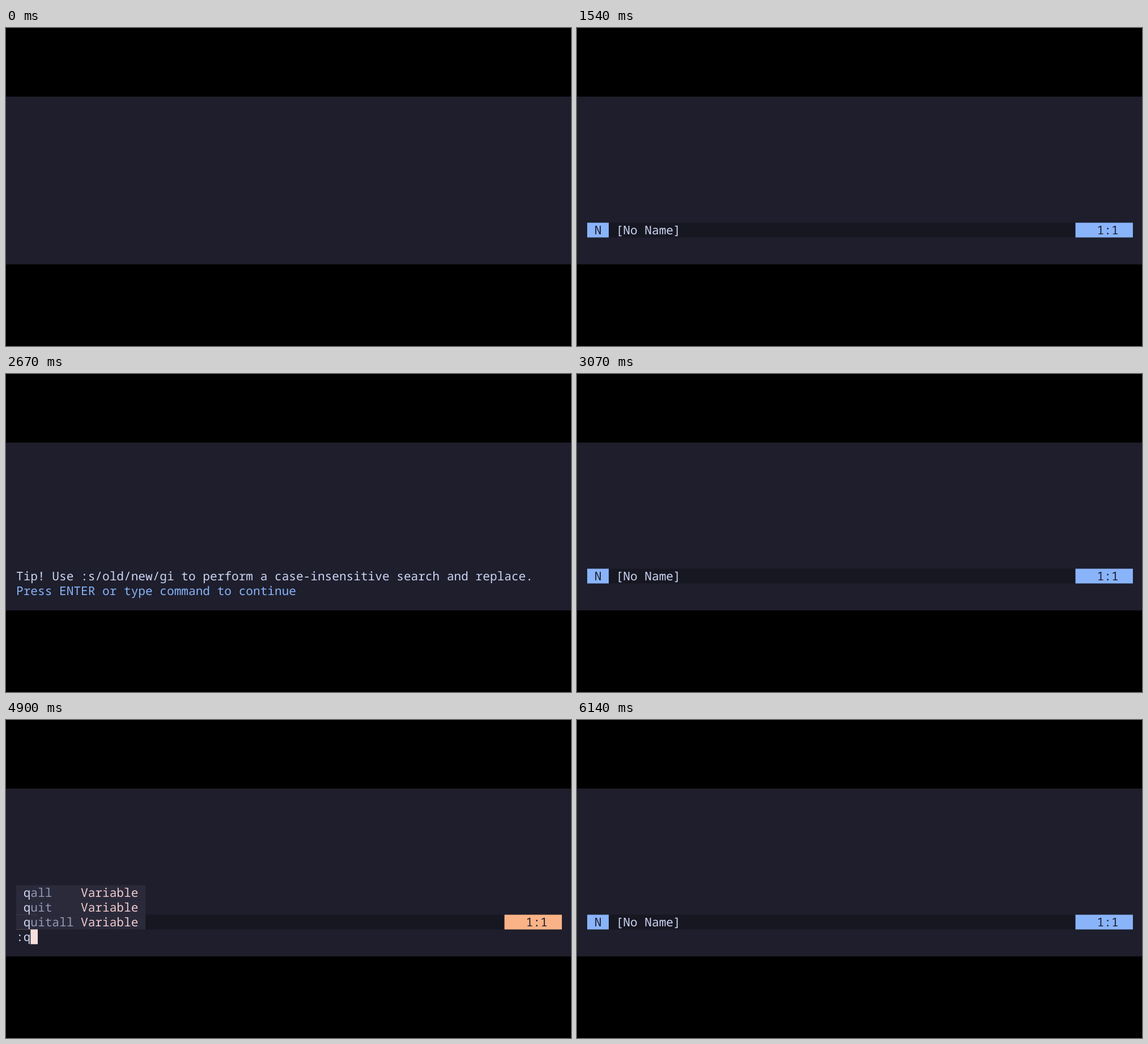
Write an HTML page that moves like this. It is 997 px wide and 561 px high and loops after 8 s.

```html
<!DOCTYPE html>
<html lang="en">
<head>
<meta charset="utf-8">
<title>Editor tip</title>
<style>
  html, body { margin: 0; height: 100%; overflow: hidden; background: #000; }
  svg { display: block; width: 997px; height: 561px; }
  text {
    font: 21.11px "Noto Sans Mono", "DejaVu Sans Mono", monospace;
    text-rendering: geometricPrecision;
    white-space: pre;
  }
</style>
</head>
<body>
<svg viewBox="0 0 997 561">
  <rect y="121" width="997" height="296" fill="#1e1e2c"/>
</svg>
<script>
const CELL = 12.67, ROW = 26, LEFT = 18, TOP = 291.5, LOOP = 8000;
const C = {
  bar: '#171722', ink: '#1e1e2e', text: '#cdd6f4', blue: '#89b4fa', peach: '#fab387',
  menu: '#2a2a3b', dim: '#9399b2', pink: '#f2cdcd', cursor: '#f5e0dc'
};
const svg = document.querySelector('svg');

function add(parent, tag, attrs, content = '') {
  const el = document.createElementNS('http://www.w3.org/2000/svg', tag);
  for (const key in attrs) el.setAttribute(key, attrs[key]);
  el.textContent = content;
  return parent.appendChild(el);
}
const layer = () => add(svg, 'g', {});
const box = (g, col, row, cols, fill) => add(g, 'rect', {
  x: LEFT + col * CELL, y: TOP + row * ROW, width: cols * CELL, height: ROW, fill
});
const write = (g, col, row, fill, str) => add(g, 'text', {
  x: LEFT + col * CELL, y: TOP + row * ROW + 20.5, fill
}, str);

function statusLine(mode, accent) {
  const g = layer();
  box(g, 0, 2, 76, C.bar);
  box(g, 0, 2, 3, accent);
  box(g, 68, 2, 8, accent);
  write(g, 1, 2, C.ink, mode);
  write(g, 4, 2, C.text, '[No Name]');
  write(g, 71, 2, C.ink, '1:1');
  return g;
}

const normal = statusLine('N', C.blue);
const command = statusLine('C', C.peach);
write(command, 0, 3, C.text, ':');

const tip = layer();
write(tip, 0, 2, C.text, 'Tip! Use :s/old/new/gi to perform a case-insensitive search and replace.');
write(tip, 0, 3, C.blue, 'Press ENTER or type command to continue');

const typed = layer();
write(typed, 1, 3, C.text, 'q');

const menu = layer();
['all', 'uit', 'uitall'].forEach((rest, row) => {
  box(menu, 0, row, 18, C.menu);
  write(menu, 1, row, C.text, 'q');
  write(menu, 2, row, C.dim, rest);
  write(menu, 9, row, C.pink, 'Variable');
});

const cursor = layer();
box(cursor, 0, 3, 1, C.cursor);

function draw(now) {
  const t = now % LOOP;
  const during = (from, to) => t >= from && t < to;
  const show = (g, on) => g.setAttribute('visibility', on ? 'visible' : 'hidden');
  const inCommand = during(4700, 5000), hasQ = during(4800, 5000);
  show(normal, during(500, 1570) || during(3070, 4700) || t >= 6140);
  show(tip, during(1570, 3070));
  show(command, inCommand);
  show(typed, hasQ);
  show(menu, during(4840, 5000));
  show(cursor, during(2140, 2670) || inCommand);
  const col = inCommand ? (hasQ ? 2 : 1) : 39;
  cursor.setAttribute('transform', `translate(${col * CELL} 0)`);
}

const start = performance.now();
function tick() {
  draw(performance.now() - start);
  requestAnimationFrame(tick);
}
tick();
</script>
</body>
</html>
```
